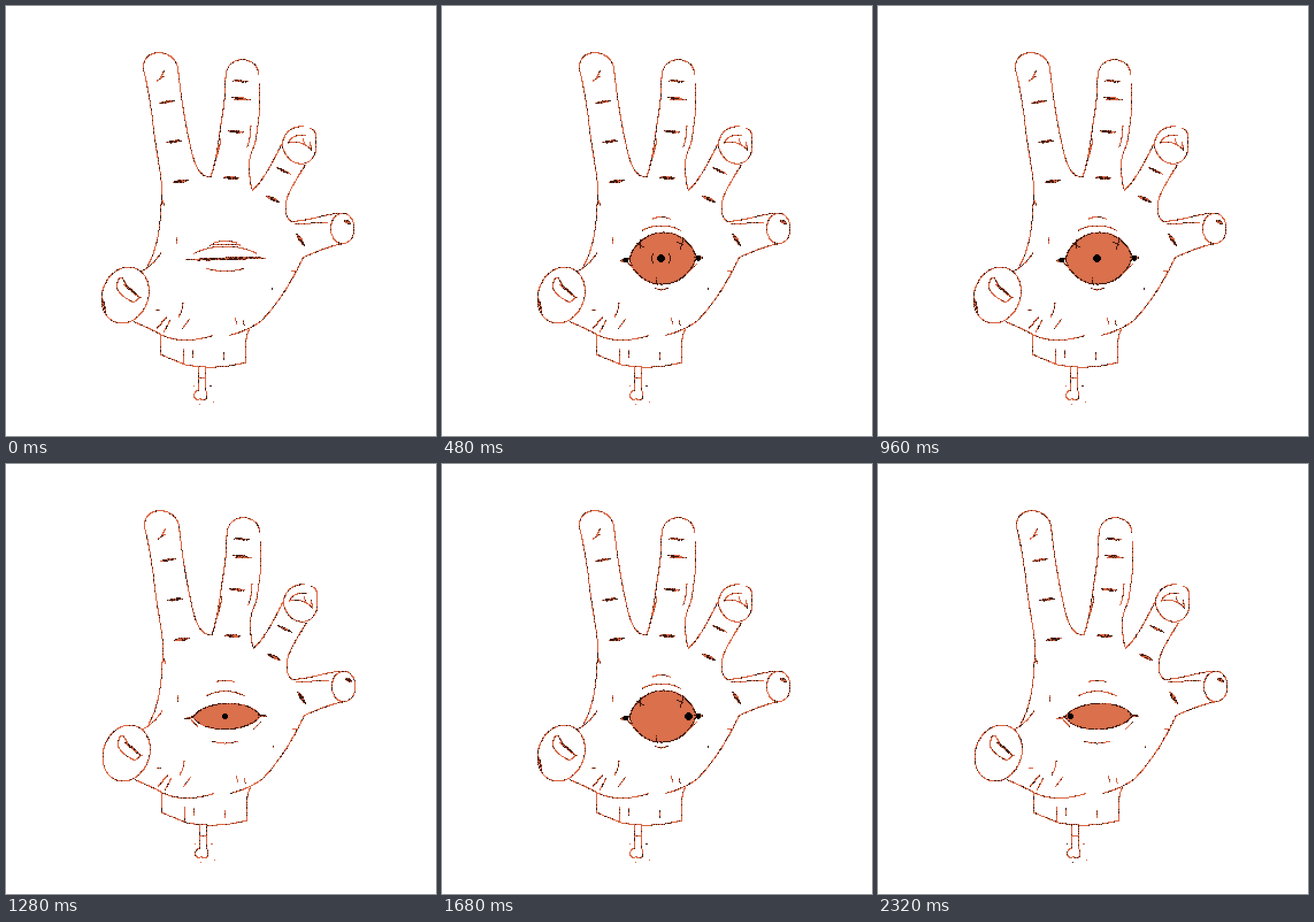
Write an HTML page with a canvas that moves like this. It is 748x748 px and loops after 2.4 s.

```html
<!DOCTYPE html>
<html lang="en">
<head>
<meta charset="utf-8">
<title>Hand with an eye</title>
<style>
  html, body { margin: 0; width: 100%; height: 100%; overflow: hidden; background: #fff; }
  canvas { display: block; width: 100vw; height: 100vh; image-rendering: pixelated; }
</style>
</head>
<body>
<canvas id="stage" width="374" height="374"></canvas>
<script>
const ctx = document.getElementById('stage').getContext('2d');
const STEP = 80, STEPS = 30, CELL = 2;
const ORANGE = '#da704c', LINE = '#d9633f', DARK = '#3a170e', BLACK = '#060303';
const EYE = { x: 384, y: 439, half: 57, lid: 45 };

let seed = 0;
function noise(x, y) {
  const v = Math.sin(x * 127.1 + y * 311.7 + seed * 74.7) * 43758.5453;
  return v - Math.floor(v);
}
const mix = (a, b, t) => a + (b - a) * t;
const ramp = (t, from, to) => Math.min(1, Math.max(0, (t - from) / (to - from)));

// Inks the cell under a stage point, dark with the given chance.
function ink(x, y, dark = 0.25) {
  const cx = Math.floor(x / CELL), cy = Math.floor(y / CELL);
  ctx.fillStyle = noise(cx, cy) < dark ? DARK : LINE;
  ctx.fillRect(cx, cy, 1, 1);
}

function disc(cx, cy, r, color) {
  ctx.fillStyle = color;
  for (let y = Math.floor((cy - r) / CELL); y * CELL <= cy + r; y++)
    for (let x = Math.floor((cx - r) / CELL); x * CELL <= cx + r; x++)
      if (Math.hypot(x * CELL + 1 - cx, y * CELL + 1 - cy) <= r) ctx.fillRect(x, y, 1, 1);
}

function sample(d) {
  const path = document.createElementNS('http://www.w3.org/2000/svg', 'path');
  path.setAttribute('d', d);
  const n = Math.ceil(path.getTotalLength());
  return Array.from({ length: n + 1 }, (_, i) => path.getPointAtLength(i));
}

function ellipse(cx, cy, rx, ry, deg = 0) {
  const a = deg * Math.PI / 180, dx = rx * Math.cos(a), dy = rx * Math.sin(a);
  const arc = `A${rx},${ry} ${deg} 0 1 `;
  return `M${cx - dx},${cy - dy} ${arc}${cx + dx},${cy + dy} ${arc}${cx - dx},${cy - dy}`;
}

const hand = [
  // index finger
  `M246,453 C262,425 268,390 270,345 C275,300 262,270 254,190 C250,165 247,140 239,110
   C236,72 292,72 299,108 C304,155 310,195 321,245 C328,280 338,298 356,297`,
  'M268,126 l7,-13 M262,131 l12,-9',
  // middle finger
  'M356,297 C366,270 369,240 373,212 C377,185 382,160 382,125 C382,82 438,86 439,118',
  'M441,135 C444,180 438,205 435,230 C432,248 423,255 423,280 Q424,312 429,320',
  'M426,208 Q426,230 419,246 M374,230 Q371,250 363,272 M396,163 h29',
  // ring finger
  'M429,320 C446,306 462,275 480,240 C484,222 495,208 518,210 M528,213 Q541,215 539,232 L538,255 C530,283 488,283 480,240',
  'M491,238 Q499,222 522,225 M528,236 l4,14 M517,230 l2,12 M491,237 Q515,233 531,250',
  'M521,276 C500,310 482,335 487,360 Q489,370 497,375',
  // little finger
  'M497,375 C530,373 555,362 578,361 M584,414 C560,418 535,430 517,437 M503,379 L558,377',
  ellipse(585.5, 387, 20.5, 26.5),
  // palm
  'M517,437 C500,475 475,515 447,545 Q425,564 388,573 M360,573 C320,586 285,583 262,567 L222,549',
  'M236,461 Q252,455 270,429 M272,338 l4,10 M296,403 v11 M497,460 h7 M462,491 v2',
  'M308,517 Q307,530 300,541 M320,544 l-14,18 M280,540 l-18,22 M286,546 l-12,22 M261,528 h6 M398,543 l4,10 M412,547 l2,7',
  // thumb
  ellipse(207.5, 503, 40, 50, 20),
  'M192,487 L197,472 L203,474 L212,490 M192,487 Q196,503 222,516 L234,506',
  // wrist and bone
  'M268,570 V606 L312,624 Q365,634 417,620 V590 Q417,575 424,560 M308,597 V622 M324,598 V612 M379,602 V614',
  'M335,629 V668 C322,672 326,690 338,683 C350,692 352,672 346,668 V629 M336,647 H345',
  'M354,661 h2 M325,661 h1 M359,688 h1 M335,692 h1'
].flatMap(sample);

const lashes = sample('M338,412 l13,8 M344,407 v14 M420,405 l-6,19 M409,411 l11,4 M372,473 l2,11');

// Short mark that swells in the middle: dark core, orange edge.
function crease(x, y, length, angle, weight = 2.4) {
  const c = Math.cos(angle), s = Math.sin(angle);
  for (let u = -1; u <= 1; u += 2 / length) {
    const w = weight * (1 - u * u);
    for (let v = -w; v <= w; v++)
      ink(x + u * c * length / 2 - v * s, y + u * s * length / 2 + v * c, 0.6);
  }
}

// Creases spaced along a finger from knuckle to tip.
function knuckles(x1, y1, x2, y2, count, angle, bend = 1) {
  for (let k = 0; k < count; k++) {
    const t = 1 - (1 - k / (count - 1)) ** bend;
    crease(mix(x1, x2, t), mix(y1, y2, t), 25, angle, 2.4 - 1.2 * t);
  }
}

function drawHand(pose) {
  ctx.save();
  ctx.translate(pose ? 1 : 0, 0);
  hand.forEach(p => ink(p.x, p.y));
  knuckles(304, 305, 280, 167, 3, -0.13);
  knuckles(392, 299, 408, 131, 4, 0.08, 1.6);
  knuckles(464, 336, 483, 287, 2, 0.45);
  crease(512, 407, 24, 1);
  crease(594, 376, 14, 0.6);
  crease(219, 496, 34, 0.7, 1.5);
  if (!pose) crease(170, 520, 26, 1.3, 1.5);
  ctx.restore();
}

// Skin fold: a shallow arc centred on the eye.
function fold(y, half, rise) {
  for (let x = -half; x <= half; x++) ink(381 + x, y + rise * (x / half) ** 2);
}

const lidHeight = u => EYE.lid * Math.max(0, 1 - u * u) ** 0.62;

function drawBall(open) {
  ctx.fillStyle = ORANGE;
  for (let x = EYE.x - EYE.half; x < EYE.x + EYE.half; x += CELL) {
    const u = (x - EYE.x) / EYE.half, h = open * lidHeight(u), y = EYE.y - 1.5 * u;
    const top = Math.round((y - h) / CELL);
    ctx.fillRect(Math.floor(x / CELL), top, 1, Math.round((y + h) / CELL) - top);
  }
  for (let a = 0; a < Math.PI * 2; a += 0.008) {
    const u = Math.cos(a);
    ink(EYE.x + EYE.half * u, EYE.y - 1.5 * u + Math.sign(Math.sin(a)) * open * lidHeight(u), 0.75);
  }
}

function ripple(r) {
  for (let a = -0.5; a < 0.6; a += 0.1)
    for (const side of [-1, 1])
      ink(381 + side * r * Math.cos(a), 439 + side * r * Math.sin(a), 1);
}

// The lids meet at the start of the loop and once in a blink.
function openness(i) {
  const gap = Math.min(...[0, 17, STEPS].map(shut => Math.abs(i - shut)));
  return Math.min(1, gap / 2);
}

function drawEye(i) {
  const open = openness(i), parted = Math.min(1, open * 2);
  fold(418 - 36 * open ** 0.66, mix(54, 33, parted), mix(12, 8, parted));
  fold(409 - 42 * open ** 0.35, mix(20, 15, parted), 3);
  fold(461 + 33 * open ** 0.4, mix(32, 11, open), -4);

  if (!open) {
    fold(415, 26, 1);
    crease(382, 440, 140, -0.025, 2);
    return;
  }

  drawBall(open);
  crease(319, 442, 16, -0.25, 3 * open);
  crease(446, 438, 16, 0.15, 3 * open);
  for (const side of [-1, 1])
    for (let t = 0; t < 12; t++) ink(382 + side * (60 - t), 447 + t + side * 2);

  const moved = 48 * ramp(i, 19, 21) - 94 * ramp(i, 23, 25);
  if (open === 1) {
    lashes.forEach(p => ink(p.x, p.y, 0.9));
    disc(319.5, 442, 5, BLACK);
    disc(446, 438.5, 5, BLACK);
    if (i >= 5 && i <= 7) ripple(16 + (i - 6) * 5);
    if (i === 25) for (let x = 352; x < 390; x += 15.5) disc(x, 440, 1.7, DARK);
  }
  disc(381 + moved, 439, 5 + 1.4 * (open === 1), BLACK);
}

let start, shown = -1;
function tick(now) {
  start ??= now;
  const i = Math.floor((now - start) / STEP) % STEPS;
  if (i !== shown) {
    shown = i;
    seed = i % 3;
    ctx.fillStyle = '#fff';
    ctx.fillRect(0, 0, 374, 374);
    drawHand(seed);
    drawEye(i);
  }
  requestAnimationFrame(tick);
}
requestAnimationFrame(tick);
</script>
</body>
</html>
```
